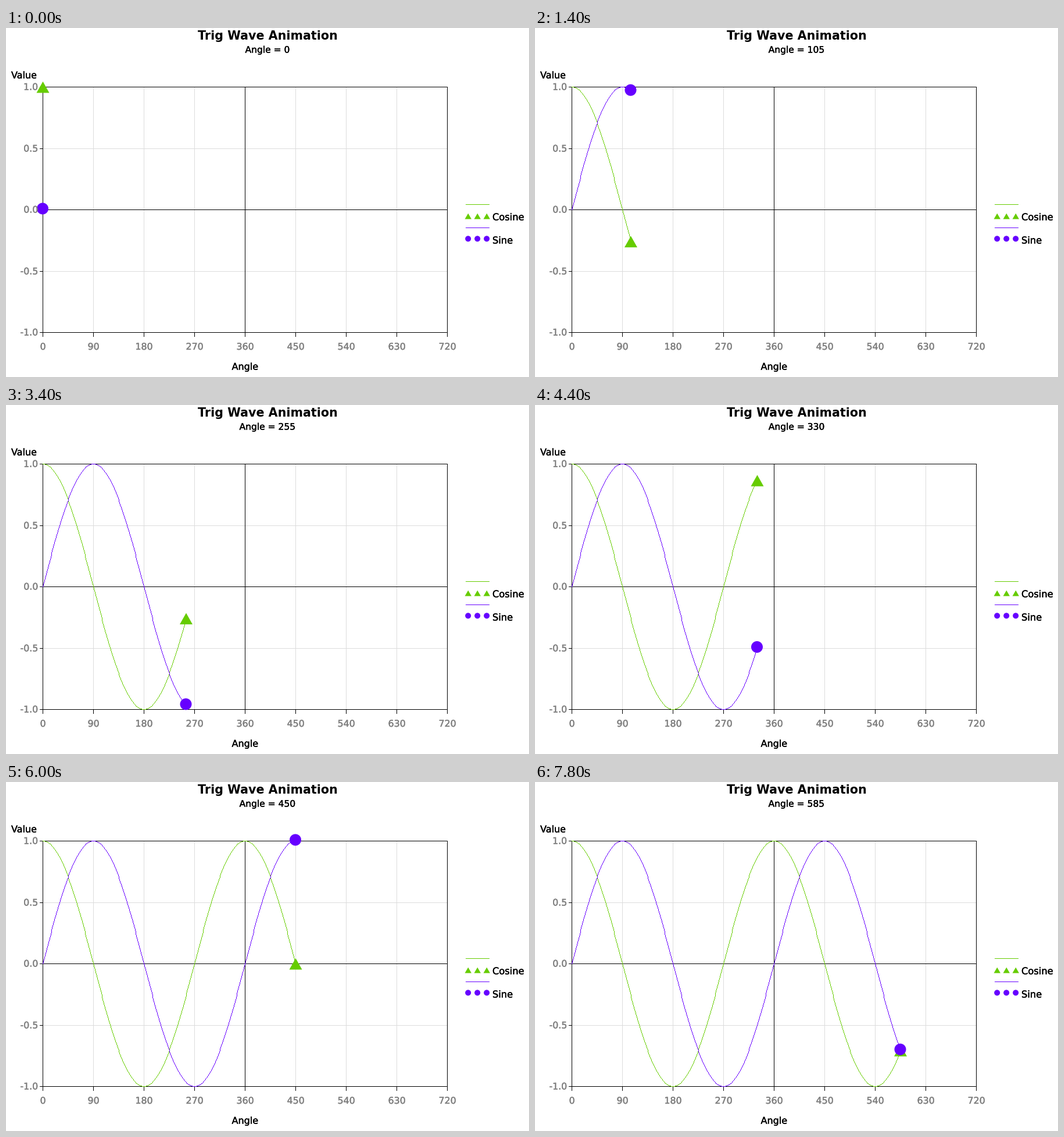
Write a matplotlib script that moves like this. It is 900 by 600 pixels and loops after 8 s.

```python
import numpy as np
import matplotlib.pyplot as plt
from matplotlib.animation import FuncAnimation
from matplotlib.colors import to_rgba
from matplotlib.patches import Circle, Polygon, Rectangle
from matplotlib.patheffects import withStroke

W, H, DPI = 900, 600, 100
FRAMES, INTERVAL, STEP = 40, 200, 15
LEFT, RIGHT, TOP, BOTTOM = 63, 759, 101, 523
MID = (TOP + BOTTOM) // 2

GREEN, PURPLE = "#66cc00", "#6600ff"
GRID, TICK_TEXT = "#dcdcdc", "#808080"

plt.rcParams["font.family"] = "DejaVu Sans"
fig = plt.figure(figsize=(W / DPI, H / DPI), dpi=DPI, facecolor="white")
ax = fig.add_axes([0, 0, 1, 1])


def px(angle):
    return LEFT + angle * (RIGHT - LEFT) / 720


def py(value):
    return MID - value * (BOTTOM - TOP) / 2


def rule(x0, y0, x1, y1, color="black", z=2):
    """One-pixel horizontal or vertical line, both ends included."""
    ax.add_patch(Rectangle((x0, y0), x1 - x0 + 1, y1 - y0 + 1,
                           fc=color, lw=0, zorder=z))


def label(x, y, text, size=16, ha="center", color="black", weight="normal"):
    t = ax.text(x, y, text, fontsize=size * 72 / DPI, ha=ha, va="baseline",
                color=color, weight=weight, zorder=6)
    if weight == "normal":  # slightly heavier than regular
        t.set_path_effects([withStroke(linewidth=0.3, foreground=color)])
    return t


def triangle_points(x, y, half, up, down):
    return [(x - half, y + down), (x + half, y + down), (x, y - up)]


def triangle(x, y, half, up, down):
    return ax.add_patch(Polygon(triangle_points(x, y, half, up, down),
                                fc=GREEN, lw=0, zorder=4))


def dot(x, y, r):
    return ax.add_patch(Circle((x, y), r, fc=PURPLE, lw=0, zorder=5))


def draw_axes():
    for angle in range(0, 721, 90):
        x = int(px(angle))
        rule(x, TOP, x, BOTTOM, GRID, 1)
        rule(x, BOTTOM, x, BOTTOM + 7)
        label(x + 0.5, 553, str(angle), 15.8, color=TICK_TEXT)
    for value in (1.0, 0.5, 0.0, -0.5, -1.0):
        y = int(py(value) + 0.5)
        rule(LEFT, y, RIGHT, y, GRID, 1)
        rule(LEFT - 5, y, LEFT, y)
        label(55, y + 5.5, f"{value:.1f}", 15.8, "right", TICK_TEXT)
    for x in (LEFT, int(px(360)), RIGHT):
        rule(x, TOP, x, BOTTOM)
    for y in (TOP, MID, BOTTOM):
        rule(LEFT, y, RIGHT, y)


def draw_legend():
    rule(791, 303, 831, 303, GREEN)
    rule(791, 343, 831, 343, PURPLE)
    for x in (795, 811, 827):
        triangle(x + 0.3, 324, 5.7, 5.3, 4.5)
        dot(x + 0.2, 362.3, 5)
    label(837, 330.5, "Cosine", 16.3, "left")
    label(837, 370.5, "Sine", 16.3, "left")


def trace(canvas, wave, last, color):
    """Hard-edged one-pixel polyline with a whole-pixel vertex per degree."""
    a = np.arange(last + 1)
    xs = np.floor(px(a) + 0.5).astype(int)
    ys = np.floor(py(wave(np.radians(a))) + 0.5).astype(int)
    for x0, y0, x1, y1 in zip(xs, ys, xs[1:], ys[1:]):
        n = max(abs(x1 - x0), abs(y1 - y0)) + 1
        cols = np.floor(np.linspace(x0, x1, n) + 0.5).astype(int)
        rows = np.floor(np.linspace(y0, y1, n) + 0.5).astype(int)
        canvas[rows, cols] = to_rgba(color)


draw_axes()
draw_legend()
label(450, 20, "Trig Wave Animation", 20.6, weight="bold")
label(9, 86.5, "Value", ha="left")
label(411.5, 587.5, "Angle")
subtitle = label(450, 42.5, "", 15.5)
curves = ax.imshow(np.zeros((H, W, 4)), extent=(0, W, H, 0), aspect="auto",
                   interpolation="nearest", zorder=3)
cos_mark = triangle(0, 0, 11, 10, 9.5)
sin_mark = dot(0, 0, 10)
ax.set_xlim(0, W)
ax.set_ylim(H, 0)
ax.axis("off")


def update(frame):
    angle = STEP * frame
    canvas = np.zeros((H, W, 4))
    trace(canvas, np.cos, angle, GREEN)
    trace(canvas, np.sin, angle, PURPLE)
    curves.set_data(canvas)
    x, rad = px(angle), np.radians(angle)
    cos_mark.set_xy(triangle_points(x + 0.5, py(np.cos(rad)) + 1, 11, 10, 9.5))
    sin_mark.center = (x, py(np.sin(rad)) - 1.5)
    subtitle.set_text(f"Angle = {angle}")
    return curves, cos_mark, sin_mark, subtitle


anim = FuncAnimation(fig, update, frames=FRAMES, interval=INTERVAL,
                     repeat=True, repeat_delay=0, blit=False)
plt.show()
```
